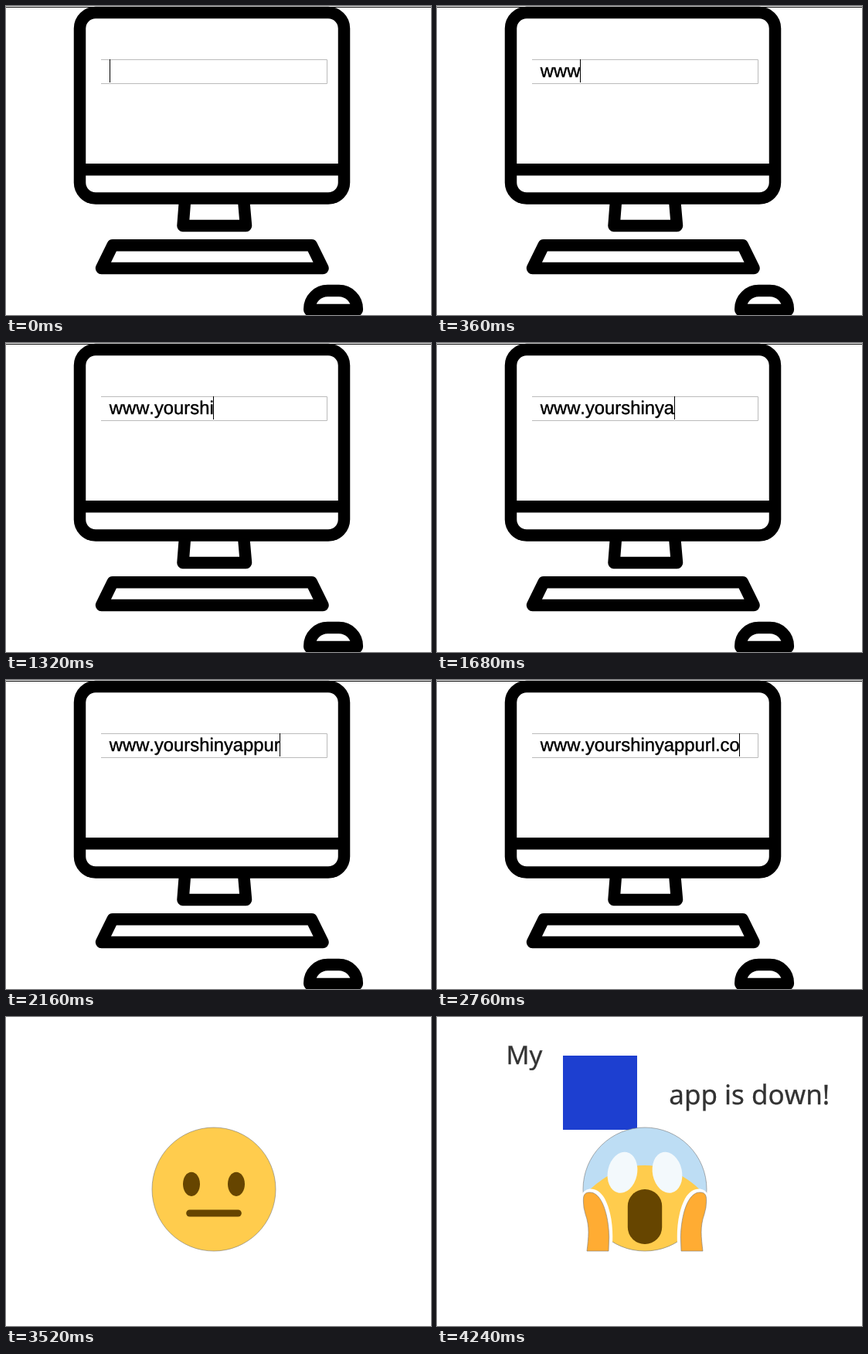
These frames come from a looping animation (550 by 400 pixels, 4920 ms). An HTML page:

```html
<!DOCTYPE html>
<html lang="en">
<head>
<meta charset="utf-8">
<title>App is down</title>
<style>
  html, body { margin: 0; width: 100%; height: 100%; overflow: hidden; background: #fff; }
  svg { display: block; width: 550px; height: 400px; }
  text { font-family: "Liberation Sans", Arial, sans-serif; font-kerning: none; text-rendering: geometricPrecision; }
  .caption text { font-family: "Noto Sans", "Open Sans", sans-serif; fill: #333; stroke: #333; stroke-width: .3; }
  .thick { fill: none; stroke: #000; stroke-width: 15.5; stroke-linejoin: round; }
  .dark { fill: #664500; }
  .rim { stroke: #777; stroke-width: .6; }
</style>
</head>
<body>
<svg viewBox="0 0 550 400">
  <defs>
    <clipPath id="disc"><circle cx="269" cy="223" r="80"/></clipPath>
    <g id="hand">
      <path fill="#fff" d="M188 229C192 221 207 218 217 235C226 252 228 275 227 292V304H188Z"/>
      <path class="rim" fill="#ffac33" d="M189.4 239C189 229 192 227 198 227C213 227 222 255 222.7 285L222 303H194C196 285 198 272 192 255Q189.4 247 189.4 239Z"/>
    </g>
  </defs>

  <g id="computer">
    <path d="M0 1H550V2H0Z"/>
    <g class="thick">
      <rect x="95.5" y="8.5" width="342" height="240.5" rx="20.5"/>
      <path d="M96 211.7H437"/>
      <path d="M231.7 250L229 284.5H310.5L307.5 250"/>
      <path d="M138 309.8H395.5L410 339.5H123.5Z"/>
      <path d="M392.8 393.5V392A23.5 23.5 0 0 1 416.3 368.5H430.8A23.5 23.5 0 0 1 454.3 392V393.5Z"/>
    </g>
    <g id="address">
      <path fill="none" stroke="#bbb" d="M123 69.5H415.5V100.5H123"/>
      <text id="url" x="133.8" y="92" font-size="23.8" stroke="#000" stroke-width=".4"></text>
      <rect id="caret" y="69" width="1" height="30"/>
    </g>
    <g id="error">
      <path fill="none" stroke="#e04848" stroke-width="4.6" stroke-linejoin="round" d="M180 76.8L202.4 117.3H157.6Z"/>
      <path fill="#3a3a3c" d="M177 94Q177 92 180 92T183 94L181.8 103.5Q180 105 178.2 103.5Z"/>
      <circle cx="180" cy="108" r="2.1" fill="#3a3a3c"/>
      <text x="226.5" y="111" font-size="36" fill="#3a3a3c">Error</text>
    </g>
  </g>

  <g id="neutral">
    <circle class="rim" cx="269" cy="223" r="80" fill="#ffcc4d"/>
    <g class="dark">
      <ellipse cx="240" cy="216.3" rx="11" ry="15.6"/>
      <ellipse cx="298" cy="216.3" rx="11" ry="15.6"/>
      <rect x="233.2" y="249.5" width="71.6" height="9" rx="4.5"/>
    </g>
  </g>

  <g id="scream">
    <g class="caption">
      <text x="89.5" y="61" font-size="33">My</text>
      <rect x="163" y="50" width="96" height="96" fill="#1d3fd0"/>
      <text x="300.3" y="113" font-size="35">app is down!</text>
    </g>
    <g clip-path="url(#disc)">
      <path fill="#bdddf4" d="M189 143H349V303H189Z"/>
      <path fill="#ffcc4d" d="M189 232C208 212 235 192 269 192S330 212 349 232V303H189Z"/>
    </g>
    <circle class="rim" cx="269" cy="223" r="80" fill="none"/>
    <g fill="#f3f9fc">
      <ellipse cx="240" cy="201.3" rx="19" ry="26.8" transform="rotate(12 240 201.3)"/>
      <ellipse cx="298" cy="201.3" rx="19" ry="26.8" transform="rotate(-12 298 201.3)"/>
    </g>
    <rect class="dark" x="246.8" y="223" width="44.4" height="71" rx="22"/>
    <use href="#hand"/>
    <use href="#hand" transform="matrix(-1 0 0 1 538 0)"/>
  </g>
</svg>
<script>
  const LOOP = 4920, KEY = 120, PAUSE = 2520;
  const ADDRESS = "www.yourshinyappurl.com";
  const $ = id => document.getElementById(id);
  const show = (id, on) => { $(id).style.display = on ? "" : "none"; };

  function typeAddress(t) {
    // One key per beat, with one beat skipped after the last dot.
    const count = Math.floor(t / KEY) - (t >= PAUSE ? 1 : 0);
    const url = $("url");
    url.textContent = ADDRESS.slice(0, count);
    const width = count ? url.getComputedTextLength() : 0;
    $("caret").setAttribute("x", Math.floor(134 + width));
  }

  function draw(now) {
    const t = now % LOOP;
    show("computer", t < 3520);
    show("address", t < 3000);
    show("error", t >= 3000);
    show("neutral", t >= 3520 && t < 4240);
    show("scream", t >= 4240);
    if (t < 3000) typeAddress(t);
  }

  const start = performance.now();
  function tick() {
    draw(performance.now() - start);
    requestAnimationFrame(tick);
  }
  tick();
</script>
</body>
</html>
```
